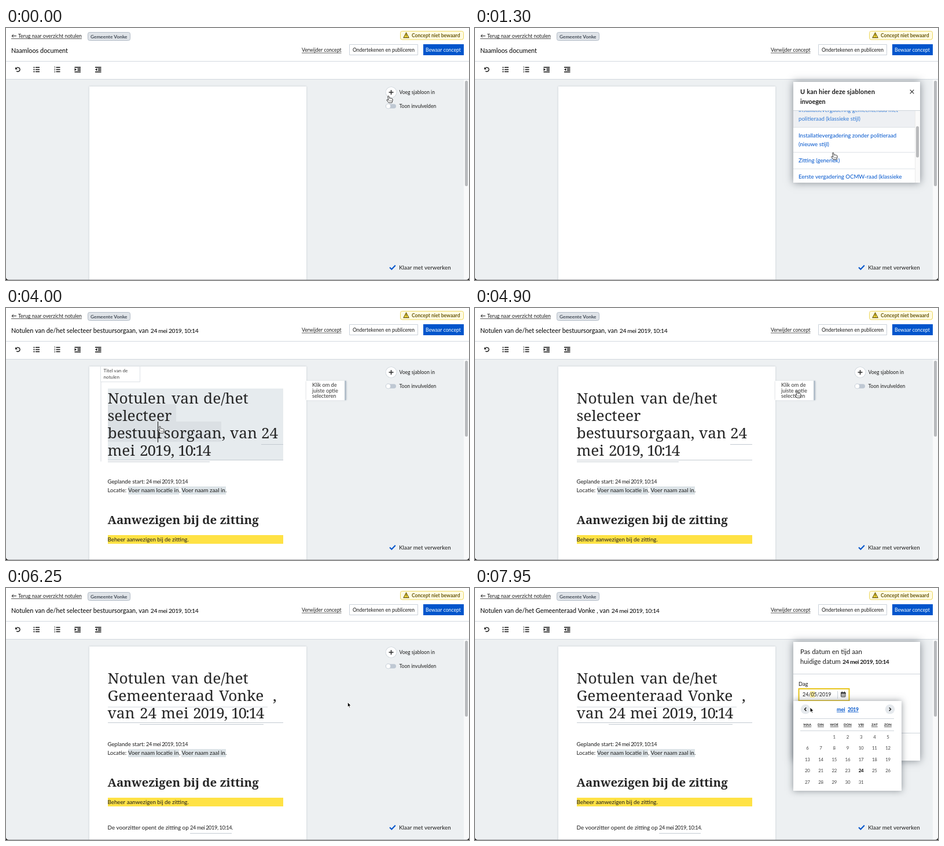
Recreate the animation shown at these times as an HTML page with a canvas. Size 800 px wide and 435 px high, loop 8 s.

```html
<!DOCTYPE html>
<html lang="nl">
<head>
<meta charset="utf-8">
<title>Notulen</title>
<style>
html, body { margin: 0; width: 100%; height: 100%; overflow: hidden; background: #edf0f2; }
canvas { display: block; width: 800px; height: 435px; }
</style>
</head>
<body>
<canvas id="stage"></canvas>
<script>
const LOOP = 8000, W = 800, H = 435;
const canvas = document.getElementById('stage');
const ratio = window.devicePixelRatio || 1;
canvas.width = W * ratio;
canvas.height = H * ratio;
const c = canvas.getContext('2d');

const SANS = 'Lato, "Open Sans", sans-serif', SERIF = '"Noto Serif", serif';
const INK = '#1c1c1c', BLUE = '#0055cc', LINE = '#cbd2da', YELLOW = '#ffe245';
const PLACE = 'Vonke';
const DATE = '24 mei 2019, 10:14';

// ---- drawing helpers ----
function text(s, x, y, size, o = {}) {
  c.font = `${o.weight || 400} ${size}px ${o.font || SANS}`;
  c.letterSpacing = (o.gap || 0) + 'px';
  c.textAlign = o.align || 'left';
  c.fillStyle = o.color || INK;
  c.fillText(s, x, y);
  const w = c.measureText(s).width;
  if (o.under) box(o.align === 'center' ? x - w / 2 : x, y + 1.4, w, 0.7, c.fillStyle);
  return w;
}
function box(x, y, w, h, color) {
  c.fillStyle = color;
  c.fillRect(x, y, w, h);
}
function frame(x, y, w, h, fill, stroke, r = 0, width = 1) {
  c.beginPath();
  c.roundRect(x + 0.5, y + 0.5, w - 1, h - 1, r);
  c.fillStyle = fill;
  c.fill();
  c.lineWidth = width;
  c.strokeStyle = stroke;
  c.stroke();
}
function path(points, color, width, fill) {
  c.beginPath();
  points.forEach(([x, y], i) => i ? c.lineTo(x, y) : c.moveTo(x, y));
  if (fill) {
    c.closePath();
    c.fillStyle = fill;
    c.fill();
  }
  if (color) {
    c.strokeStyle = color;
    c.lineWidth = width;
    c.stroke();
  }
}
function disc(x, y, r, color) {
  c.beginPath();
  c.arc(x, y, r, 0, Math.PI * 2);
  c.fillStyle = color;
  c.fill();
}
function raised(x, y, w, h, blur, shade) {
  c.save();
  c.shadowColor = shade;
  c.shadowBlur = blur * ratio;
  box(x, y, w, h, '#fff');
  c.restore();
}
const within = (t, a, b) => t >= a && t < b;
const ease = p => { p = Math.min(1, Math.max(0, p)); return p * p * (3 - 2 * p); };

// ---- header and toolbar ----
function turnArrow(x, y, r, flip) {
  c.save();
  c.translate(x, y);
  c.scale(flip ? -1 : 1, 1);
  c.beginPath();
  c.arc(0, 0, r, -2.5, 2.3);
  c.strokeStyle = INK;
  c.lineWidth = 1.5;
  c.stroke();
  path([[-r - 1, -r - 0.6], [-r - 1, -0.3], [-0.6, -0.3]], null, 0, INK);
  c.restore();
}
function listIcon(x, numbered) {
  for (let i = 0; i < 3; i++) {
    const y = 68 + i * 3.7;
    box(x + 3.5, y - 0.8, 7, 1.6, INK);
    if (numbered) text(i + 1, x, y + 1.3, 3.8, { weight: 700 });
    else disc(x + 1, y, 1.1, INK);
  }
}
function indentIcon(x, out) {
  box(x, 67, 10.5, 1.6, INK);
  box(x + 5, 69.7, 5.5, 1.6, INK);
  box(x + 5, 72.3, 5.5, 1.6, INK);
  box(x, 75, 10.5, 1.6, INK);
  const [a, b] = out ? [x + 3.5, x] : [x, x + 3.5];
  path([[a, 69.3], [b, 71.8], [a, 74.3]], null, 0, INK);
}
function header(title, dated) {
  box(0, 0, W, 88, '#fff');
  box(0, 57, W, 1, '#d3d9df');
  box(0, 88, W, 1, '#d3d9df');
  path([[18, 13.7], [10, 13.7]], INK, 1);
  path([[13, 10.9], [10, 13.7], [13, 16.5]], INK, 1);
  box(9, 18.3, 12, 0.7, INK);
  text('Terug naar overzicht notulen', 21, 16.9, 8.8, { under: true });
  frame(141, 7, 74, 15, '#dfe3e8', '#b3bcc7', 3);
  text('Gemeente ' + PLACE, 146, 17.5, 8.3, { weight: 700, color: '#444d58' });
  const w = text(title, 9, 43.2, 10.83, { color: '#000' });
  if (dated) text(DATE, 12.6 + w, 43.2, 10.4, { color: '#000', gap: -0.4 });

  frame(681, 5, 110, 15.5, '#fffbe3', '#eed75c', 3);
  path([[691.5, 8.2], [696, 16.6], [687, 16.6]], '#5f5000', 1.1, '#ffe449');
  box(691, 11, 1, 3, '#5f5000');
  box(691, 14.7, 1, 1, '#5f5000');
  text('Concept niet bewaard', 701, 16.1, 8.55, { weight: 700, color: '#6b5a0c' });

  text('Verwijder concept', 511, 41.3, 8.6, { under: true });
  frame(593, 28, 119, 19, '#fff', LINE);
  text('Ondertekenen en publiceren', 599, 41, 8.57);
  box(721, 28, 70, 19, BLUE);
  text('Bewaar concept', 725, 41, 8.65, { color: '#fff' });

  turnArrow(20.5, 71.7, 3.5);
  listIcon(47.5);
  listIcon(83, true);
  indentIcon(118.5);
  indentIcon(154, true);
}

// ---- document ----
// Numbers are set tighter the more narrow ones they hold.
function words(list, y) {
  for (const [s, x] of list) {
    const number = /\d/.test(s);
    const gap = number ? -0.1 - (s.split('1').length - 1) : 0;
    text(s, x, y, number ? 26 : 26.3, { font: SERIF, weight: 300, color: '#262626', gap });
  }
}
function tag(bottom) {
  box(163.5, 100, 1, bottom - 100, '#d5dadf');
  frame(163, 100, 69, 28, '#fff', '#dde2e6');
  text('Titel van de', 168.5, 110.8, 8.2, { color: '#444' });
  text('notulen', 168.5, 121.6, 8.2, { color: '#444' });
}
function hint(lines) {
  const h = lines.length * 9.6 + 5;
  raised(519, 125.5, 69, h, 3, 'rgba(60,75,90,.3)');
  box(585, 125.5, 3, h, '#b4c0cb');
  lines.forEach((s, i) => text(s, 529, 136 + i * 9.6, 9.2, { color: '#333' }));
}
function heading(s) {
  const rule = '#c3cad1';
  if (s.chosen) {
    if (s.hover) {
      box(176, 139, 303, 93, '#e6ebee');
      box(231, 205, 214, 30, '#dbe0e4');
    }
    box(176, 205, 276, 1, '#d3d9de');
    box(176, 232, 303, 1, rule);
    box(231, 235, 214, 1, rule);
    words([['Notulen', 175.5], ['van', 286], ['de/het', 341]], 165);
    words([['Gemeenteraad', 175.5], [PLACE, 368], [',', 461]], 195);
    words([['van', 175.5], ['24', 231], ['mei', 268], ['2019,', 323], ['10:14', 389]], 225);
  } else {
    if (s.hover) box(176, 139, 303, 123, '#e6ebee');
    const mark = s.picking ? YELLOW : s.hover ? '#dbe0e4' : null;
    if (mark) {
      box(176, 166, 118, 31, mark);
      box(176, 196, 196, 35, mark);
    }
    box(441, 235, 38, 1, rule);
    box(176, 262, 303, 1, rule);
    box(176, 265, 176, 1, rule);
    words([['Notulen', 175.5], ['van', 286], ['de/het', 341]], 165);
    words([['selecteer', 175.5]], 195);
    words([['bestuursorgaan,', 175.5], ['van', 387], ['24', 441]], 225);
    words([['mei', 175.5], ['2019,', 231], ['10:14', 297]], 255);
  }
  if (s.caret) box(s.caret, 196, 1, 36, '#111');
}
function body(s) {
  c.save();
  c.translate(0, s.chosen ? -30 : 0);
  const date = { gap: -0.4 };
  text('Geplande start:', 175.5, 303.2, 9.6);
  box(242, 309, 72, 1, '#d3d9de');
  text(DATE, 242, 303.2, 9.2, date);
  box(211, 308, 88, 14, '#dce3e7');
  box(303, 308, 77, 14, '#dce3e7');
  text('Locatie:', 175.5, 318.2, 9.6);
  text('Voer naam locatie in', 211, 318.2, 9.8);
  text(',', 299, 318.2, 9.8);
  text('Voer naam zaal in', 303.5, 318.2, 9.8);
  text('.', 379, 318.2, 9.8);
  text('Aanwezigen bij de zitting', 175.5, 373, 20.5, { font: SERIF, weight: 700, color: '#262626' });
  if (s.marked) box(176, 392, 303, 15, YELLOW);
  text('Beheer aanwezigen bij de zitting.', 175.5, 402.6, 9.75);
  text('De voorzitter opent de zitting op', 175.5, 447.4, 9.8);
  text(DATE, 318, 447.4, 9.2, date);
  text('.', 390, 447.4, 9.8);
  box(318, 453, 72, 1, '#c3cad1');
  c.restore();
}

// ---- side panels ----
function sidebar() {
  disc(665.5, 111, 9.8, '#cfd6dd');
  disc(665.5, 111, 9, '#fff');
  box(661.5, 110.2, 8, 1.6, '#333');
  box(664.7, 107, 1.6, 8, '#333');
  text('Voeg sjabloon in', 679.5, 114, 8.55);
  c.beginPath();
  c.roundRect(656, 131.2, 18, 7.6, 3.8);
  c.fillStyle = '#bfc8d3';
  c.fill();
  disc(660.5, 135, 4.4, '#b6c0cc');
  disc(660.5, 135, 3.8, '#fff');
  text('Toon invulvelden', 679.5, 138.1, 8.58);
}
function status(busy) {
  if (busy) {
    turnArrow(668, 413.3, 3.8, true);
    text('Aan het laden', 679, 416.5, 10);
  } else {
    path([[663, 413.3], [666.3, 416.5], [672.8, 409.7]], BLUE, 2.1);
    text('Klaar met verwerken', 679, 416.5, 9.85);
  }
}
function panel(h, split) {
  raised(550, 93, 219, h, 13, 'rgba(40,50,60,.55)');
  box(550, split, 219, 1, '#cfd5db');
}
function rows(items, top, scroll, thumb, hover) {
  c.save();
  c.beginPath();
  c.rect(550, top + 1, 219, 124);
  c.clip();
  let y = top - scroll;
  items.forEach((item, i) => {
    const lines = item.lines, h = lines.length * 14.7 + 13.8 + (item.period ? 15.8 : 0);
    const on = i === hover;
    if (on) box(550, y, 210, h, '#eef0f3');
    lines.forEach((s, k) => text(s, 559, y + 17.2 + k * 14.9, 9.65, { color: on ? '#2f78d6' : BLUE }));
    if (item.period) text('BESTUURSPERIODE: VANAF 01/01/2019', 569, y + h - 12.2, 6.8, { gap: 0.98, color: '#555' });
    y += h;
    box(550, y - 0.5, 210, 1, '#dde1e6');
  });
  box(760, top, 9, 126, '#fafafa');
  box(760, top, 0.7, 126, '#e4e4e4');
  c.beginPath();
  c.roundRect(762, top + 3 + scroll * 0.43, 5, thumb, 2.5);
  c.fillStyle = '#b9babc';
  c.fill();
  c.restore();
}
const STYLES = [
  ['Installatievergadering gemeenteraad met', 'politieraad (nieuwe stijl)'],
  ['Installatievergadering gemeenteraad met', 'politieraad (klassieke stijl)'],
  ['Installatievergadering zonder politieraad', '(nieuwe stijl)'],
  ['Zitting (generiek)'],
  ['Eerste vergadering OCMW-raad (klassieke', 'stijl)'],
  ['Eerste vergadering OCMW-raad (nieuwe', 'stijl)'],
  ['Installatievergadering zonder politieraad', '(klassieke stijl)']
].map(lines => ({ lines }));
const BODIES = [
  ['Gemeenteraad ' + PLACE],
  ['College van Burgemeester en Schepenen', PLACE],
  ['Burgemeester ' + PLACE]
].map(lines => ({ lines, period: true }));

function templates(t) {
  panel(174, 142);
  text('U kan hier deze sjablonen', 562, 114, 11, { weight: 700, gap: 0.15 });
  text('invoegen', 562, 130.6, 10.8, { weight: 700 });
  path([[751.7, 106.7], [758.3, 113.3]], '#333', 1.2);
  path([[758.3, 106.7], [751.7, 113.3]], '#333', 1.2);
  const hover = t < 750 ? -1 : t < 1400 ? 1 : 3;
  rows(STYLES, 142, 57 * ease((t - 850) / 350), 54, hover);
}
function organs(t) {
  panel(200, 168);
  text('Voeg het relevante', 562, 114, 10.9, { weight: 700 });
  text('bestuursorgaan toe.', 562, 130.6, 10.9, { weight: 700 });
  text('Vindt u het juiste bestuurorgaan niet? Meld aan', 562, 144.8, 8.7);
  text('met de juiste bestuurseenheid.', 562, 158.2, 8.7);
  rows(BODIES, 168, 0, 44, t > 5350 ? 0 : -1);
}
function dates(active) {
  panel(205, 148);
  box(550, 250, 219, 1, '#cfd5db');
  text('Pas datum en tijd aan', 562, 113.6, 11.4);
  text('huidige datum', 562, 130.6, 11.2);
  text(DATE, 635, 130.6, 10.2, { weight: 700, gap: -0.43 });
  text('Dag', 559, 168.8, 9.3);
  text('Uur', 559, 215, 9.3);
  text('Minuten', 620, 215, 9.2);
  frame(559, 173.5, 88, 21.5, '#fff', active ? '#e8c51c' : LINE, 0, active ? 2 : 1);
  if (active) box(579, 178, 8, 11, '#fff0a0');
  text('24/05/2019', 566, 187.4, 8.95);
  box(626, 178, 1, 13, LINE);
  frame(632, 180, 8.5, 8.5, '#fff', '#333', 1);
  box(632, 180, 8.5, 2.6, '#333');
  box(633.7, 178.6, 1.3, 2, '#333');
  box(637.5, 178.6, 1.3, 2, '#333');
  for (let i = 0; i < 6; i++) box(633.6 + i % 3 * 2, 183.6 + (i / 3 | 0) * 2, 1.3, 1.3, '#333');
  frame(559, 220, 59, 21, '#fff', LINE);
  frame(620, 220, 59, 21, '#fff', LINE);
  text('10', 566, 233.7, 8.5, { gap: -0.3 });
  text('14', 627, 233.7, 8.5, { gap: -0.3 });
  box(559, 261, 46, 21.5, BLUE);
  text('Pas aan', 566, 275, 9.7, { color: '#fff' });
}
function calendar() {
  raised(550, 195, 187, 155, 11, 'rgba(40,50,60,.5)');
  disc(571, 209.3, 8.3, '#e5e9ed');
  disc(717, 209.3, 8.3, '#e5e9ed');
  path([[572.3, 206.5], [569.5, 209.3], [572.3, 212.1]], '#222', 1.5);
  path([[715.7, 206.5], [718.5, 209.3], [715.7, 212.1]], '#222', 1.5);
  text('mei', 625, 212.5, 9, { weight: 700, color: BLUE, under: true });
  text('2019', 644, 212.5, 8.6, { weight: 700, color: BLUE, gap: -0.3, under: true });
  box(562, 225, 162, 1, '#cfd5db');
  box(562, 246, 162, 1, '#cfd5db');
  const col = i => 574.3 + i * 23.2;
  ['MAA', 'DIN', 'WOE', 'DON', 'VRI', 'ZAT', 'ZON'].forEach((d, i) =>
    text(d, col(i), 238, 5.9, { weight: 700, align: 'center', under: true }));
  for (let d = 1; d <= 31; d++) {
    const cell = d + 1;
    text(d, col(cell % 7), 260 + (cell / 7 | 0) * 19.4, 7.8,
      { align: 'center', weight: d === 24 ? 700 : 400, color: d === 24 ? '#000' : '#444', gap: -0.2 });
  }
}

// ---- pointer: time, x, y, hand ----
const TRACK = [
  [0, 661, 117, 1], [350, 664, 112, 1], [550, 664, 112, 1], [850, 624, 208, 1],
  [1300, 619, 215, 1], [1500, 606, 225, 1], [1700, 606, 225, 0], [2400, 528, 211, 0],
  [2950, 528, 211, 0], [3350, 266, 204, 1], [4350, 266, 204, 1], [4750, 556, 143, 1],
  [5000, 556, 143, 1], [5450, 620, 193, 1], [5800, 618, 195, 1], [6100, 618, 195, 0],
  [6850, 354, 214, 1], [7100, 354, 214, 0], [7550, 612, 183, 0], [7720, 612, 183, 0],
  [7940, 579, 206, 0], [8000, 579, 206, 0]
];
function pointer(t) {
  let i = 0;
  while (i < TRACK.length - 2 && TRACK[i + 1][0] <= t) i++;
  const [t0, x0, y0, hand] = TRACK[i], [t1, x1, y1] = TRACK[i + 1];
  const p = ease((t - t0) / (t1 - t0));
  c.save();
  c.translate(x0 + (x1 - x0) * p, y0 + (y1 - y0) * p);
  c.lineJoin = 'round';
  if (hand) {
    path([[-0.2, 7.8], [-1.4, 1], [-0.5, 0], [0.6, 0.6], [1.5, 4.3], [3.4, 4], [5.4, 4.6], [7, 5.6],
      [7, 8.2], [5.8, 12], [0.4, 12], [-3.3, 7.6], [-2.6, 6.5], [-0.2, 7.8]], '#222', 0.9, '#fff');
    for (const x of [1.5, 3.3, 5]) path([[x, 7.5], [x + 0.2, 10]], '#444', 0.6);
  } else {
    path([[0, 0], [0, 8.6], [1.9, 6.9], [3.2, 9.8], [4.6, 9.2], [3.4, 6.3], [6, 6.1], [0, 0]], '#fff', 1, '#000');
  }
  c.restore();
}

function titleAt(t) {
  if (t < 2700) return 'Naamloos document';
  return 'Notulen van de/het ' + (t < 6450 ? 'selecteer bestuursorgaan, van' : `Gemeenteraad ${PLACE} , van`);
}

function draw(t) {
  c.setTransform(ratio, 0, 0, ratio, 0, 0);
  box(0, 0, W, H, '#edf0f2');
  raised(144, 101, 375, 340, 3, 'rgba(60,75,90,.22)');

  const filled = t >= 1750;
  const s = {
    chosen: t >= 6150,
    hover: within(t, 3250, 4900) || within(t, 6850, 7300),
    picking: within(t, 5000, 6150),
    marked: t >= 3700,
    caret: within(t, 3400, 4600) ? 262 : within(t, 6900, 7300) ? 353 : 0
  };
  if (filled) {
    heading(s);
    body(s);
    if (s.hover) tag(s.chosen ? 235 : 265);
  }
  box(791, 89, 9, H, '#f8f9fa');
  c.beginPath();
  c.roundRect(793, 91, 5, filled ? 131 : 182, 2.5);
  c.fillStyle = '#b8babd';
  c.fill();
  header(titleAt(t), t >= 3500);
  sidebar();
  if (within(t, 3450, 5000)) hint(['Klik om de', 'juiste optie', 'selecteren']);
  if (within(t, 6900, 7300)) hint(['Geplande', 'start']);
  status(within(t, 1800, 2500) || within(t, 3000, 3700) || within(t, 6300, 7300));

  if (within(t, 500, 1700)) templates(t);
  if (s.picking) organs(t);
  if (t >= 6950) dates(t >= 7650);
  if (t >= 7750) calendar();

  box(0, 434.3, W, 0.7, '#8a8c8e');
  path([[0, 431], [1, 433.5], [4, 435], [0, 435]], null, 0, '#000');
  path([[800, 431], [799, 433.5], [796, 435], [800, 435]], null, 0, '#000');
  pointer(t);
}

const begin = performance.now();
function tick() {
  draw((performance.now() - begin) % LOOP);
  requestAnimationFrame(tick);
}
tick();
</script>
</body>
</html>
```
